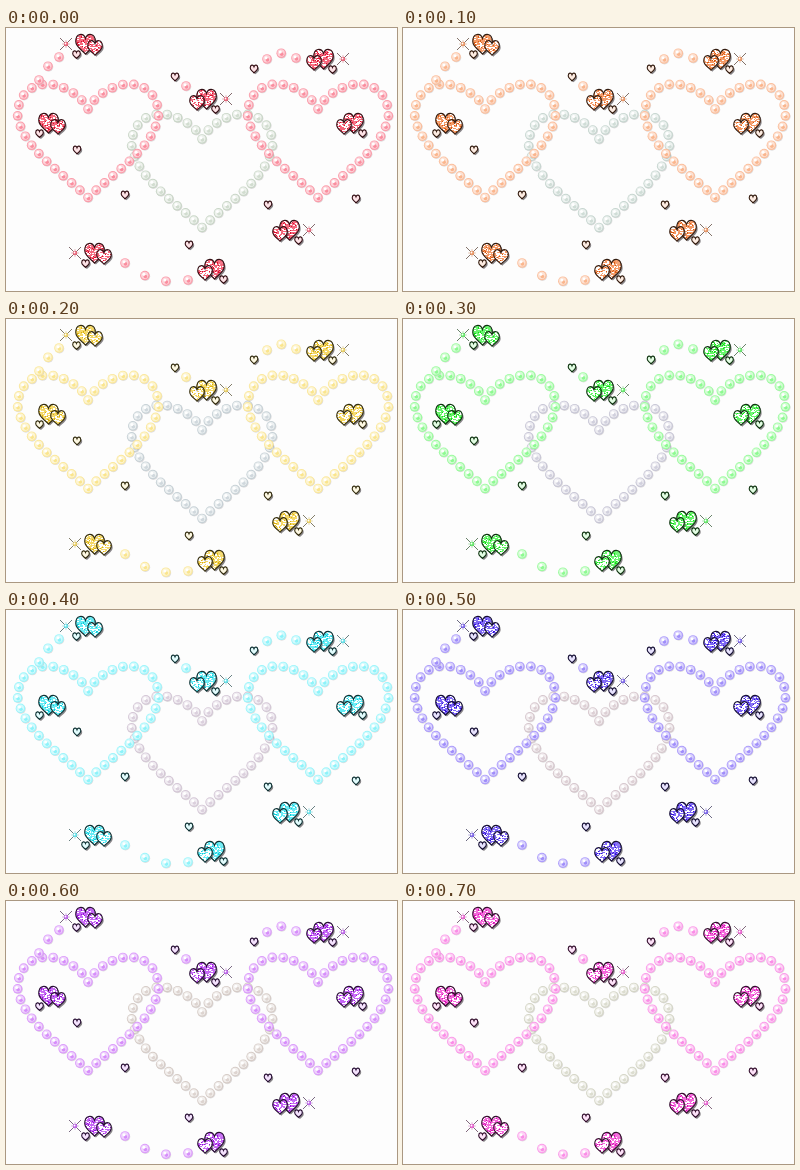
An HTML page with a canvas that plays this animation: 391x263 px, repeating every 0.8 s.

```html
<!DOCTYPE html>
<html lang="en">
<head>
<meta charset="utf-8">
<title>Pearl hearts</title>
<style>
  html, body { margin: 0; width: 100%; height: 100%; overflow: hidden; background: #fdfdfd; }
  canvas { display: block; }
</style>
</head>
<body>
<canvas id="stage" width="391" height="263"></canvas>
<script>
const ctx = document.getElementById('stage').getContext('2d');
const STEP = 100;
const HUES = [351, 22, 48, 122, 184, 250, 280, 311];
const HALF_GAPS = 19;

// right half of the pearl heart, from the notch to the tip
const outline = document.createElementNS('http://www.w3.org/2000/svg', 'path');
outline.setAttribute('d',
  'M0 81C7 66 28 56 40 56C60 56 70.5 70 70.5 87C66 120 28 143 0 169.5');

const unitHeart = new Path2D(
  'M0-.3C.1-.6 .5-.6 .5-.14C.5 .14 .2 .27 0 .5C-.2 .27-.5 .14-.5-.14C-.5-.6-.1-.6 0-.3Z');

// centre, side of the small heart, star or not
const clusters = [
  [83, 17, -1, true], [314, 32, 1, true], [197, 72, 1, true], [46, 96, -1, false],
  [344, 96, 1, false], [92, 226, -1, true], [280, 203, 1, true], [205, 242, 1, false]
];
const singles = [[248, 41], [169, 49], [71, 122], [119, 167], [262, 177], [350, 171], [183, 217]];

const hsl = (h, s, l) => `hsl(${h},${s}%,${l}%)`;

function random(seed) {
  return () => (seed = (seed * 16807) % 2147483647) / 2147483647;
}

function disc(x, y, r, color) {
  ctx.fillStyle = color;
  ctx.beginPath();
  ctx.arc(x, y, r, 0, Math.PI * 2);
  ctx.fill();
}

function line(x1, y1, x2, y2) {
  ctx.beginPath();
  ctx.moveTo(x1, y1);
  ctx.lineTo(x2, y2);
  ctx.stroke();
}

function pearl(x, y, { h, s, rim, body, core }) {
  disc(x + 0.6, y + 0.7, 4.7, 'rgba(120,110,115,.22)');
  disc(x, y, 4.8, hsl(h, s, rim));
  disc(x - 0.2, y - 0.2, 3.7, hsl(h, s, body));
  disc(x + 0.5, y + 0.9, 1.8, hsl(h, s, core));
  disc(x - 1, y - 1.3, 1.5, '#fff');
}

function pearlHeart(cx, dy, tint) {
  const length = outline.getTotalLength();
  for (let i = 0; i <= HALF_GAPS; i++) {
    const { x, y } = outline.getPointAtLength(length * i / HALF_GAPS);
    pearl(cx + x, y + dy, tint);
    if (i % HALF_GAPS) pearl(cx - x, y + dy, tint);
  }
}

// n pearls along a quadratic curve
function pearlArc(n, [x0, y0], [cx, cy], [x1, y1], tint) {
  for (let i = 0; i < n; i++) {
    const t = i / (n - 1), u = 1 - t;
    const at = (a, b, c) => u * u * a + 2 * u * t * b + t * t * c;
    pearl(at(x0, cx, x1), at(y0, cy, y1), tint);
  }
}

function heart(x, y, size, hue, fill, decorate) {
  const path = new Path2D();
  path.addPath(unitHeart, new DOMMatrix([size, 0, 0, size, x, y]));
  ctx.save();
  ctx.translate(1.4, 1.5);
  ctx.fillStyle = 'rgba(40,35,40,.55)';
  ctx.fill(path);
  ctx.restore();
  ctx.fillStyle = fill;
  ctx.fill(path);
  if (decorate) {
    ctx.save();
    ctx.clip(path);
    decorate();
    ctx.restore();
  }
  ctx.lineWidth = 1.1;
  ctx.strokeStyle = hsl(hue, 55, 13);
  ctx.stroke(path);
}

// white: share of white flecks
function glitterHeart(x, y, size, hue, white, rnd) {
  heart(x, y, size, hue, hsl(hue, 88, 68), () => {
    for (let i = 0; i < size * size * 0.6; i++) {
      const k = rnd();
      ctx.fillStyle = k < white ? '#fff' : hsl(hue, 85, k < 0.8 ? 72 : 46);
      ctx.fillRect(
        Math.floor(x + (rnd() - 0.5) * size),
        Math.floor(y + (rnd() - 0.5) * size),
        k < white ? 2 : 1, 1);
    }
  });
}

function smallHeart(x, y, hue) {
  heart(x, y, 7.6, hue, hsl(hue, 90, 94));
}

function star(x, y, hue) {
  ctx.lineWidth = 0.9;
  ctx.strokeStyle = hsl(hue, 14, 40);
  line(x - 6, y - 6, x + 6, y + 6);
  line(x - 6, y + 6, x + 6, y - 6);
  ctx.strokeStyle = hsl(hue, 45, 80);
  line(x - 4, y, x + 4, y);
  line(x, y - 4, x, y + 4);
  disc(x, y, 2.2, hsl(hue, 75, 66));
  disc(x - 0.5, y - 0.5, 0.9, '#fff');
}

function cluster([x, y, side, hasStar], i, hue) {
  const rnd = random(977 * (i + 3));
  if (hasStar) star(x + 23 * side, y - 1, hue);
  glitterHeart(x + 3.5 * side, y - 0.7, 19.5, hue, 0.36, rnd);
  glitterHeart(x - 6 * side, y + 3, 14.5, hue, 0.6, rnd);
  smallHeart(x + 12.5 * side, y + 9.7, hue);
}

function draw(step) {
  const hue = HUES[step];
  const tint = { h: hue, s: 92, rim: 80, body: 91, core: 77 };
  const white = { h: 110 + 45 * step, s: 16, rim: 81, body: 94, core: 84 };
  ctx.fillStyle = '#fdfdfd';
  ctx.fillRect(0, 0, 391, 263);
  pearlHeart(196, 30, white);
  pearlHeart(82, 0, tint);
  pearlHeart(312, 0, tint);
  pearlArc(3, [53, 29], [41, 36], [33, 52], tint);
  pearlArc(3, [261, 31], [275, 20], [290, 30], tint);
  pearlArc(4, [119, 235], [148, 259], [182, 252], tint);
  pearl(180, 58, tint);
  singles.forEach(([x, y]) => smallHeart(x, y, hue));
  clusters.forEach((c, i) => cluster(c, i, hue));
}

let shown = -1;
function tick() {
  const step = Math.floor(performance.now() / STEP) % HUES.length;
  if (step !== shown) draw(shown = step);
  requestAnimationFrame(tick);
}
tick();
</script>
</body>
</html>
```
